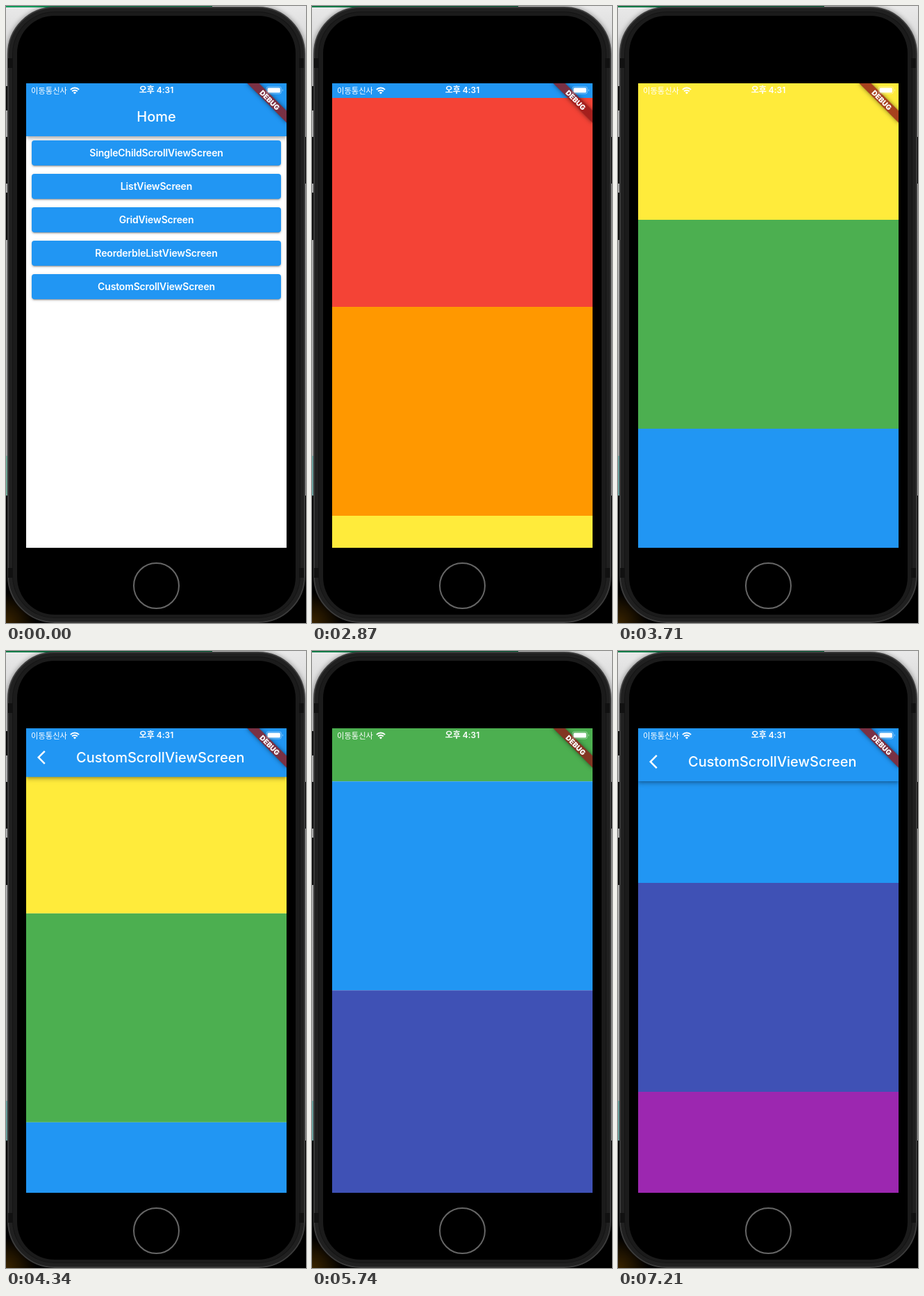
These frames come from a looping animation (432 px wide and 886 px high, 8.75 s). An HTML page:

```html
<!DOCTYPE html>
<html lang="ko">
<head>
<meta charset="utf-8">
<title>Scroll view demo</title>
<style>
  html, body { margin: 0; width: 100%; height: 100%; overflow: hidden; background: #000; }
  div, svg { position: absolute; box-sizing: border-box; }
  #stage {
    width: 432px; height: 886px; overflow: hidden;
    font-family: Inter, "Noto Sans CJK KR", "Noto Sans CJK", sans-serif; color: #fff;
    background:
      radial-gradient(circle at 0 886px, #3a2400, transparent 45px),
      linear-gradient(#e9e9e9 0, #d2d2d2 80px, #c4c4c4 703px, #000 703px);
  }
  .strip { left: 0; top: 0; width: 297px; height: 2px; background: #0a9c5c; }
  .teal { left: 0; top: 646px; width: 4px; height: 57px; background: #86c9b4; }
  .moved .strip { background: #067a47; }
  .moved .teal { background: #7fbdbb; }
  .key { background: #101010; width: 5px; }
  .case {
    left: 2px; top: 1px; width: 429px; height: 885px; border-radius: 68px;
    background: #1b1b1b; border: 2px solid #3b3b3b;
    box-shadow: 0 0 7px rgba(0,0,0,.45), inset 0 0 0 5px #202020, inset 0 0 0 6px #141414;
  }
  .band { width: 7px; height: 14px; background: #111; }
  .glass { left: 16px; top: 14px; width: 401px; height: 860px; border-radius: 54px; background: #000; }
  .home-key { left: 183px; top: 799px; width: 67px; height: 67px; border-radius: 50%; border: 2px solid #666; }

  #screen { left: 29px; top: 111px; width: 375px; height: 667px; overflow: hidden; background: #fff; }
  .page { inset: 0; background: #fff; }
  #detail { overflow: visible; }
  .bar { left: 0; top: 0; width: 375px; height: 76px; background: #2196f3; }
  .lifted { box-shadow: 0 2px 4px -1px rgba(0,0,0,.2), 0 4px 5px rgba(0,0,0,.14), 0 1px 10px rgba(0,0,0,.12); }
  .title { top: 20px; line-height: 56px; font-size: 20px; font-weight: 500; white-space: nowrap; }
  .button {
    left: 8px; width: 359px; height: 36px; border-radius: 4px; background: #2196f3;
    font-size: 14px; font-weight: 600; letter-spacing: -.15px; line-height: 36px; text-align: center;
    box-shadow: 0 3px 1px -2px rgba(0,0,0,.2), 0 2px 2px rgba(0,0,0,.14), 0 1px 5px rgba(0,0,0,.12);
  }
  .box { left: 0; width: 375px; height: 300px; }
  .ribbon {
    left: 335px; top: 28px; width: 80px; height: 12px;
    transform-origin: 40px -28px; transform: rotate(45deg);
    background: linear-gradient(rgba(183,28,28,.627), rgba(183,28,28,.627)), rgba(0,0,0,.45);
    box-shadow: 0 0 6px rgba(0,0,0,.5);
    font-size: 10.2px; font-weight: 900; line-height: 12px; text-align: center;
  }
  .carrier { left: 7px; top: 0; line-height: 20px; font-size: 11.3px; white-space: nowrap;
    font-family: "Noto Sans CJK KR", "Noto Sans CJK", sans-serif; }
  .clock { left: 0; width: 375px; top: 0; line-height: 20px; font-size: 12px; font-weight: 600; text-align: center; }
</style>
</head>
<body>
<div id="stage">
  <div class="strip"></div>
  <div class="teal"></div>
  <div class="key" style="left:0;top:115px;height:35px"></div>
  <div class="key" style="left:0;top:188px;height:67px"></div>
  <div class="key" style="left:0;top:268px;height:68px"></div>
  <div class="key" style="left:428px;top:188px;height:67px"></div>
  <div class="case"></div>
  <div class="band" style="left:3px;top:75px"></div>
  <div class="band" style="left:422px;top:75px"></div>
  <div class="band" style="left:3px;top:807px"></div>
  <div class="band" style="left:422px;top:807px"></div>
  <div class="glass"></div>
  <div class="home-key"></div>

  <div id="screen">
    <div class="page" id="home">
      <div class="bar lifted"><div class="title" style="left:0;width:375px;text-align:center">Home</div></div>
    </div>
    <div class="page" id="detail">
      <div id="list"></div>
      <div class="bar" id="bar">
        <div id="tools">
          <svg style="left:16px;top:36px" width="24" height="24" fill="#fff"><path d="M11.67 3.87L9.9 2.1 0 12l9.9 9.9 1.77-1.77L3.54 12z"/></svg>
          <div class="title" style="left:72px">CustomScrollViewScreen</div>
        </div>
      </div>
    </div>
    <div class="ribbon">DEBUG</div>
    <div class="carrier">이동통신사</div>
    <svg style="left:63px;top:5px" width="15" height="11" fill="none" stroke="#fff" stroke-width="2">
      <path d="M.9 4.1A8.6 8.6 0 0 1 13.1 4.1M3.2 6.5A5.3 5.3 0 0 1 10.8 6.5"/>
      <path d="M7 10.6L4.9 8.4A3 3 0 0 1 9.1 8.4Z" fill="#fff" stroke="none"/>
    </svg>
    <div class="clock">오후 4:31</div>
    <svg style="left:345px;top:4px" width="26" height="12" fill="#fff">
      <rect x="1" y="1" width="21.5" height="10" rx="2.8" fill="none" stroke="#fff" stroke-opacity=".4"/>
      <rect x="2.5" y="2.5" width="18.5" height="7" rx="1.5"/>
      <path d="M24 4.3a2 2 0 0 1 0 3.4z" opacity=".5"/>
    </svg>
  </div>
</div>
<script>
  const LOOP = 8750, STEP = 70, BAR = 76;
  const $ = id => document.getElementById(id);
  const clamp = (v, lo, hi) => Math.min(hi, Math.max(lo, v));

  function add(parent, cls, top) {
    const el = document.createElement('div');
    el.className = cls;
    el.style.top = top + 'px';
    parent.append(el);
    return el;
  }
  const buttons = ['SingleChildScrollView', 'ListView', 'GridView', 'ReorderbleListView', 'CustomScrollView']
    .map((name, i) => {
      const el = add($('home'), 'button', 82 + 48 * i);
      el.textContent = name + 'Screen';
      return el;
    });
  ['#f44336', '#ff9800', '#ffeb3b', '#4caf50', '#2196f3', '#3f51b5', '#9c27b0']
    .forEach((color, i) => add($('list'), 'box', BAR + 300 * i).style.background = color);

  function bezier(x1, y1, x2, y2) {
    const at = (a, b, u) => 3 * a * u * (1 - u) ** 2 + 3 * b * u * u * (1 - u) + u ** 3;
    return x => {
      if (x <= 0 || x >= 1) return clamp(x, 0, 1);
      let lo = 0, hi = 1;
      for (let i = 0; i < 24; i++) {
        const mid = (lo + hi) / 2;
        if (at(x1, x2, mid) < x) lo = mid; else hi = mid;
      }
      return at(y1, y2, lo);
    };
  }
  const slideEase = bezier(.35, .91, .33, .97);
  const fadeEase = bezier(.4, 0, .2, 1);
  const dragEase = bezier(.35, .2, .3, 1);

  const part = (t, t0, t1) => clamp((t - t0) / (t1 - t0), 0, 1);
  const drag = (from, to, t, t0, t1) => from + (to - from) * dragEase(part(t, t0, t1));
  // Friction: speed decays by e^-2 per second until a touch stops it at t1.
  function fling(from, to, t, t0, t1) {
    const run = ms => 1 - Math.exp(-ms / 500);
    return from + (to - from) * run(clamp(t, t0, t1) - t0) / run(t1 - t0);
  }

  function scrollAt(t) {
    if (t < 2870) return 0;
    if (t < 2940) return 55;
    if (t < 3780) return fling(151, 780, t, 2940, 3710);
    if (t < 5250) return drag(780, 704, t, 3780, 4620);
    if (t < 5320) return 730;
    if (t < 5390) return 785;
    if (t < 6510) return fling(863, 1450, t, 5390, 6440);
    return drag(1450, 1354, t, 6510, 7210);
  }

  function draw(t) {
    const push = slideEase(part(t, 800, 1200));
    $('stage').classList.toggle('moved', t >= 770);
    $('home').style.transform = `translateX(${-125 * push}px)`;
    $('detail').style.transform = `translateX(${375 * (1 - push)}px)`;
    $('detail').style.boxShadow = push > 0 && push < 1 ? '-4px 0 14px rgba(0,0,0,.12)' : 'none';
    buttons[4].style.backgroundColor = t >= 770 ? '#4dabf5' : '';

    const scroll = scrollAt(t);
    // The floating bar comes back from the offset where the direction turned.
    const turn = t < 3780 ? BAR : t < 6510 ? 780 : 1450;
    const shown = clamp(turn - scroll, 0, BAR);
    $('list').style.transform = `translateY(${-scroll}px)`;
    $('bar').style.transform = `translateY(${shown - BAR}px)`;
    $('bar').style.visibility = shown > 0 ? 'visible' : 'hidden';
    $('bar').classList.toggle('lifted', shown > BAR - scroll);
    $('tools').style.opacity = fadeEase(part((shown - 20) / 56, .25, 1));
  }

  const start = performance.now();
  function tick() {
    const t = (performance.now() - start) % LOOP;
    draw(Math.floor(t / STEP) * STEP);
    requestAnimationFrame(tick);
  }
  tick();
</script>
</body>
</html>
```
